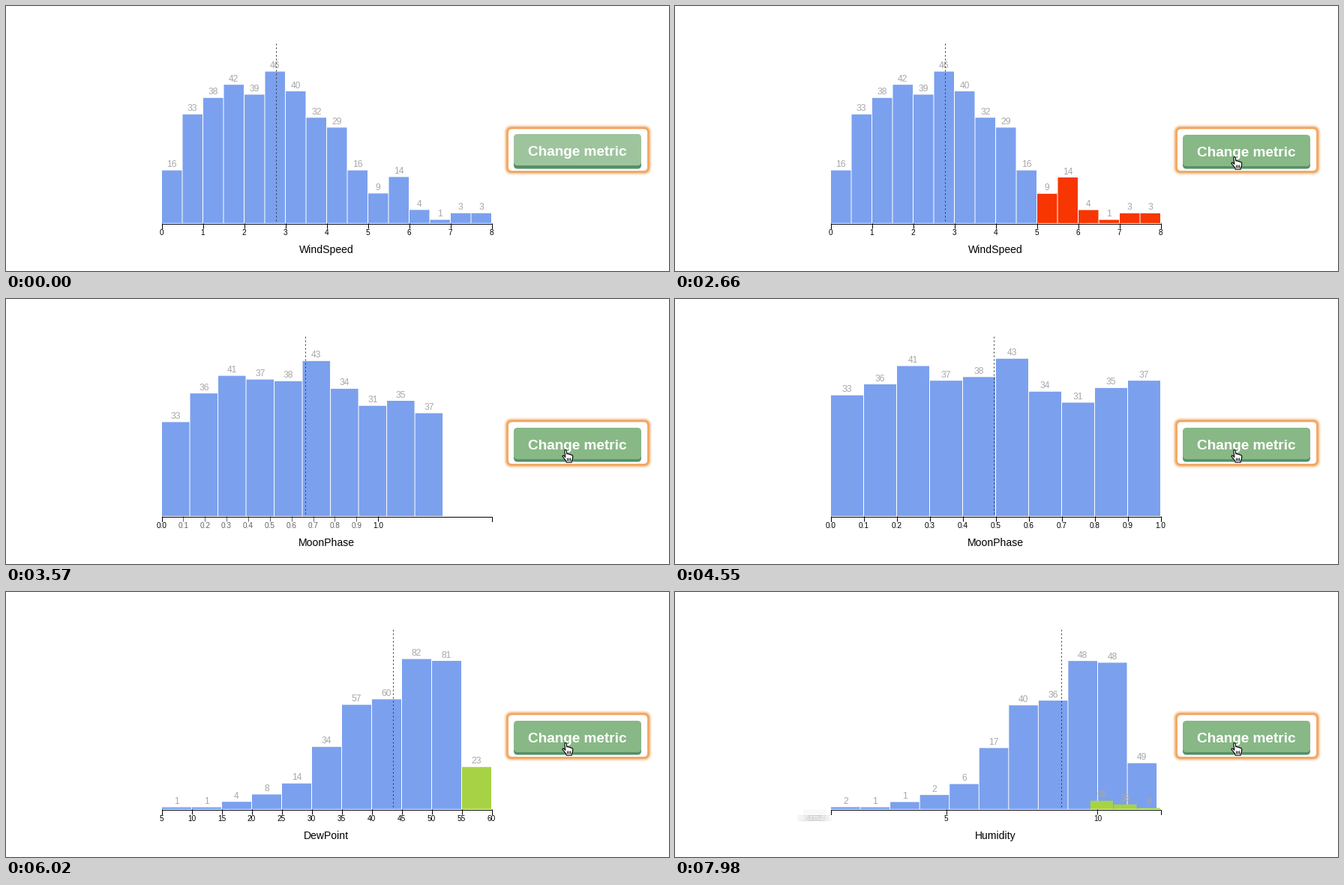
A matplotlib script for the animation above (8 s loop, 884 by 354 pixels).

```python
import matplotlib.pyplot as plt
import numpy as np
from matplotlib.animation import FuncAnimation
from matplotlib.colors import to_rgb
from matplotlib.patches import FancyBboxPatch, Polygon, Rectangle

W, H, DPI = 884, 354, 100
LOOP, STEP, TICK = 8000, 40, 70
PT = 72 / DPI
LEFT, WIDTH, BASE, PLOT_H = 207.5, 440, 290, 220
CLIP_RIGHT = 680
BLUE, GREEN, RED = "#7ba0ee", "#a8d245", "#f73602"
STARTS = [3220, 5295, 7827]  # update phase of each metric change
DURATION = 650

plt.rcParams["font.family"] = "Liberation Sans"


class Metric:
    def __init__(self, name, lo, hi, step, fmt, top, mean, counts):
        self.name, self.lo, self.hi, self.fmt = name, lo, hi, fmt
        self.top, self.mean, self.counts = top, mean, counts
        n = round((hi - lo) / step)
        self.ticks = [round(lo + i * step, 2) for i in range(n + 1)]

    def x(self, value):
        return LEFT + WIDTH * (value - self.lo) / (self.hi - self.lo)

    def bar(self, i):
        pitch = WIDTH / len(self.counts)
        height = PLOT_H * self.counts[i] / self.top
        return np.array([LEFT + 0.5 + i * pitch, pitch - 1, height])


METRICS = [
    Metric("WindSpeed", 0, 8, 1, "{:.0f}", 50, 359.8,
           [16, 33, 38, 42, 39, 46, 40, 32, 29, 16, 9, 14, 4, 1, 3, 3]),
    Metric("MoonPhase", 0, 1, 0.1, "{:.1f}", 45, 424.8,
           [33, 36, 41, 37, 38, 43, 34, 31, 35, 37]),
    Metric("DewPoint", 5, 60, 5, "{:.0f}", 90, 516,
           [1, 1, 4, 8, 14, 34, 57, 60, 82, 81, 23]),
    Metric("Humidity", 0.3, 1, 0.05, "{:.2f}", 70, 490,
           [2, 1, 1, 2, 6, 17, 40, 36, 48, 48, 49, 68, 38, 9]),
]

HAND = [(-1.2, 0.2), (0, -0.6), (1.2, 0.2), (1.8, 5), (3.6, 4.6), (4.6, 5.6),
        (6.2, 5.2), (7.2, 6.4), (8.8, 6.4), (9.8, 8), (9.4, 12), (8.2, 14),
        (8.2, 16.2), (1.2, 16.2), (0.6, 14), (-2.2, 10.6), (-4, 8.2),
        (-3.4, 7), (-1.8, 7.6), (-0.2, 9.4)]
ARROW = [(0, 0), (0, 15), (3.4, 11.8), (5.8, 17), (8, 16), (5.8, 11), (10.6, 11)]

fig = plt.figure(figsize=(W / DPI, H / DPI), dpi=DPI, facecolor="white")
ax = fig.add_axes([0, 0, 1, 1])
ax.set_xlim(0, W)
ax.set_ylim(H, 0)
ax.axis("off")
drawn = []


def ease(u):
    u = min(max(u, 0), 1)
    return 4 * u ** 3 if u < 0.5 else 1 - 4 * (1 - u) ** 3


def lerp(a, b, p):
    return a + (b - a) * p


def mix(a, b, p):
    return tuple(lerp(np.array(to_rgb(a)), np.array(to_rgb(b)), p))


def keep(artist):
    drawn.append(artist)
    return artist


def text(x, y, s, size, color="black", **kw):
    keep(ax.text(x, y, s, fontsize=size * PT, color=color, ha="center",
                 va="baseline", **kw))


def line(xs, ys, **kw):
    keep(ax.plot(xs, ys, lw=PT, solid_capstyle="butt", **kw)[0])


def rounded(x0, y0, x1, y1, r, **kw):
    return ax.add_patch(FancyBboxPatch(
        (x0, y0), x1 - x0, y1 - y0,
        boxstyle=f"round,pad=0,rounding_size={r}", **kw))


def draw_bar(geometry, count, color):
    x, w, h = geometry
    keep(ax.add_patch(Rectangle((x, BASE - h), w, h, fc=color, lw=0,
                                snap=False, zorder=2)))
    text(x + w / 2, BASE - h - 4.5, count, 12, "#a8a8a8", zorder=3)


def draw_bars(t, k, old, new, p):
    leaving = range(0)
    if k + 1 < len(METRICS) and t > STARTS[k] - DURATION:
        leaving = range(len(METRICS[k + 1].counts), len(new.counts))
        shrink = 1 - ease((t - STARTS[k] + DURATION) / DURATION)
    for i, count in enumerate(new.counts):
        goal, color = new.bar(i), BLUE
        if i < len(old.counts):
            goal = lerp(old.bar(i), goal, p)
        else:
            goal[2] *= p
            settle = ease((t - STARTS[k - 1] - DURATION) / DURATION)
            color = mix(GREEN, BLUE, settle)
        if i in leaving:
            goal[2] *= shrink
            color = RED
        draw_bar(goal, count, color)


def draw_axis(old, new, p):
    for v in sorted(set(old.ticks) | set(new.ticks)):
        entering, staying = v not in old.ticks, v in new.ticks
        alpha = p if entering else 1 if staying else 1 - p
        x = lerp(old.x(v), new.x(v), p)
        if x > CLIP_RIGHT or alpha < 0.01:
            continue
        label = (new if staying else old).fmt.format(v)
        line([x, x], [BASE, 296.5], color="black", alpha=alpha, zorder=4)
        text(x, 306, label, 10, alpha=alpha, zorder=4)
    text(427, 330, new.name, 14)


def draw_button(hover, pressed):
    shift = 3 if pressed else 1 if hover else 0
    face = "#88b886" if hover else "#9ec49d"
    keep(rounded(677, 175, 847, 217.5, 5, fc="#529169", lw=0, zorder=6))
    keep(rounded(677, 171 + shift, 847, 213 + shift, 5, fc=face, lw=0, zorder=6))
    text(761.5, 200 + shift, "Change metric", 18.95, "white", weight="bold",
         zorder=7)


def draw_cursor(t):
    """Draws the pointer and tells whether it is over the button."""
    if t < 490:
        return False
    x, y = lerp(np.array([613, 333]), np.array([680, 314]), ease((t - 490) / 140))
    go = ease((t - 980) / 630)
    x, y = lerp(x, 746, go), lerp(y, 202, go)
    hover = 677 < x < 847 and 171 < y < 218
    shape = HAND if hover else ARROW
    keep(ax.add_patch(Polygon([(x + a, y + b) for a, b in shape], fc="white",
                              ec="black", lw=1.1 * PT, joinstyle="round",
                              zorder=9)))
    if hover:
        for dx in (2.4, 4.4, 6.4):
            line([x + dx, x + dx], [y + 9.5, y + 13.5], color="black", zorder=9)
    return hover


def draw(i):
    while drawn:
        drawn.pop().remove()
    t = (i * STEP + 30) // TICK * TICK
    k = sum(t > s for s in STARTS)
    new, old = METRICS[k], METRICS[max(k - 1, 0)]
    p = ease((t - STARTS[k - 1]) / DURATION) if k else 1
    draw_bars(t, k, old, new, p)
    draw_axis(old, new, p)
    mean = lerp(old.mean, new.mean, p)
    line([mean, mean], [50, BASE], color="#333333", dashes=(2, 3),
         dash_capstyle="butt", zorder=5)
    clicks = [STARTS[0] - DURATION, STARTS[1], STARTS[2]]
    pressed = any(c - 120 <= t <= c for c in clicks)
    draw_button(draw_cursor(t), pressed)
    return drawn


# Fixed parts: domain line and glowing frame around the button
ax.plot([LEFT, LEFT, LEFT + WIDTH, LEFT + WIDTH],
        [296.5, 290.5, 290.5, 296.5], color="black", lw=PT, zorder=4)
for width, alpha in ((10, 0.08), (7.5, 0.16), (5.5, 0.28), (3.5, 0.4), (2, 0.5)):
    rounded(668.5, 163, 856.5, 221.5, 6, fc="none", ec="#f0953f",
            lw=width * PT, alpha=alpha, zorder=5)
rounded(670, 164.5, 855, 220, 5, fc="white", lw=0, zorder=5)

anim = FuncAnimation(fig, draw, frames=LOOP // STEP, interval=STEP,
                     init_func=lambda: drawn, repeat=True, repeat_delay=0,
                     blit=False)
plt.show()
```
